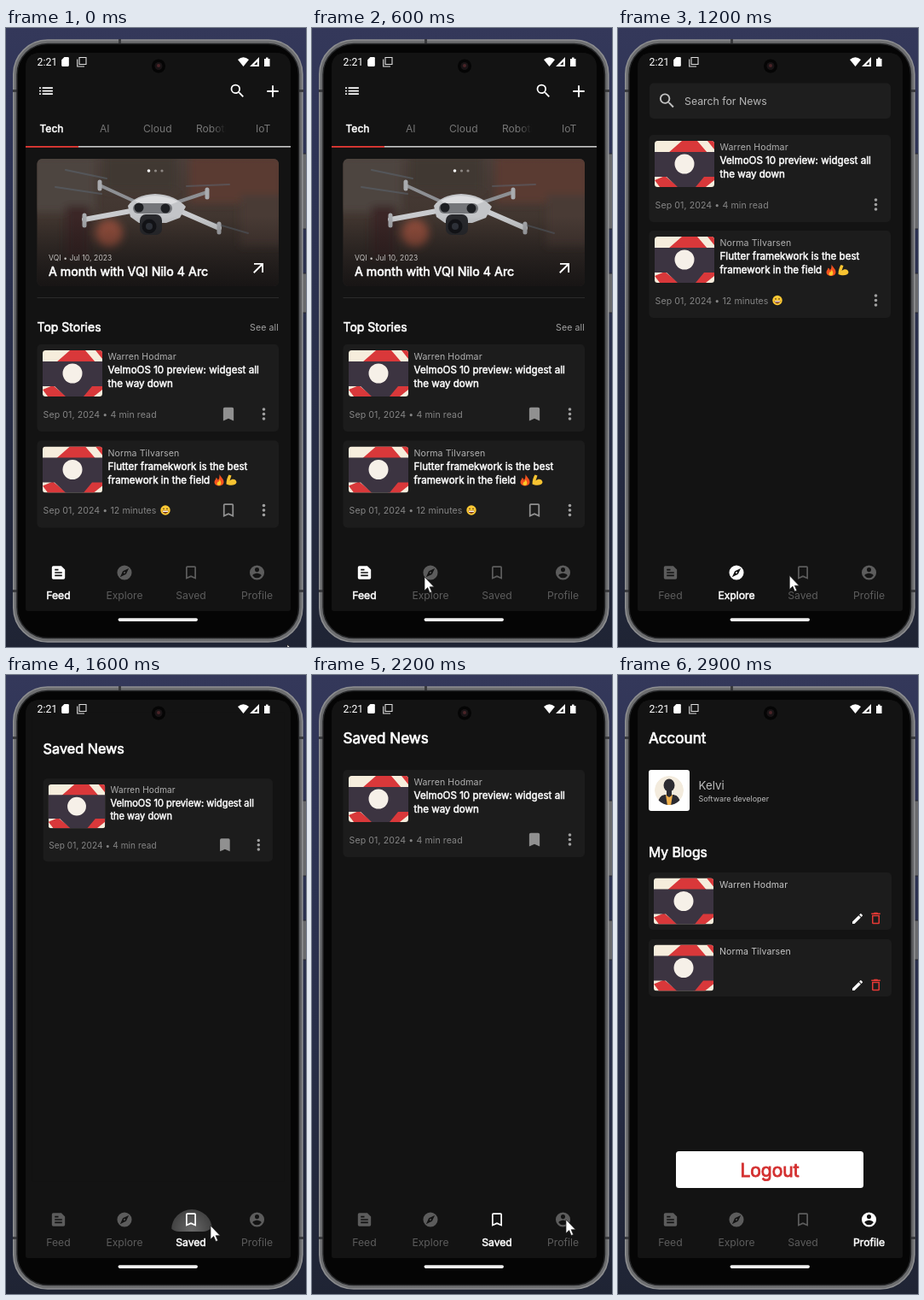
Recreate the animation shown at these times as an HTML page. Size 352 by 724 pixels, loop 3.1 s.

```html
<!DOCTYPE html>
<html lang="en">
<head>
<meta charset="utf-8">
<title>News app</title>
<style>
html, body { margin: 0; width: 100%; height: 100%; overflow: hidden; background: #282e48; }
svg { display: block; font-family: Inter, sans-serif; }
</style>
</head>
<body>
<svg id="stage" width="352" height="724" viewBox="0 0 352 724"></svg>
<script>
const LOOP = 3100, STEP = 100, CX = 178.5, CY = 318;
const RED = '#e53935', stage = document.getElementById('stage');

const ICONS = {
  list: 'M3 9h2V7H3zm0 4h2v-2H3zm0 4h2v-2H3zM7 7v2h14V7zm0 6h14v-2H7zm0 4h14v-2H7z',
  search: 'M15.5 14h-.79l-.28-.27A6.47 6.47 0 0 0 16 9.5 6.5 6.5 0 1 0 9.5 16c1.61 0 3.09-.59 4.23-1.57l.27.28v.79l5 4.99L20.49 19zm-6 0a4.5 4.5 0 1 1 0-9 4.5 4.5 0 0 1 0 9z',
  add: 'M19 13h-6v6h-2v-6H5v-2h6V5h2v6h6z',
  arrow: 'M6 6v2h8.59L5 17.59 6.41 19 16 9.41V18h2V6z',
  saved: 'M17 3H7a2 2 0 0 0-2 2v16l7-3 7 3V5a2 2 0 0 0-2-2z',
  save: 'M17 3H7a2 2 0 0 0-2 2v16l7-3 7 3V5a2 2 0 0 0-2-2zm0 15-5-2.18L7 18V5h10z',
  more: 'M12 8a2 2 0 1 0 0-4 2 2 0 0 0 0 4zm0 2a2 2 0 1 0 0 4 2 2 0 0 0 0-4zm0 6a2 2 0 1 0 0 4 2 2 0 0 0 0-4z',
  feed: 'M16 3H5a2 2 0 0 0-2 2v14a2 2 0 0 0 2 2h14a2 2 0 0 0 2-2V8zM7 7h5v2H7zm10 10H7v-2h10zm0-4H7v-2h10z',
  explore: 'M12 10.9a1.1 1.1 0 1 0 0 2.2 1.1 1.1 0 0 0 0-2.2zM12 2a10 10 0 1 0 0 20 10 10 0 0 0 0-20zm2.19 12.19L6 18l3.81-8.19L18 6z',
  profile: 'M12 2a10 10 0 1 0 0 20 10 10 0 0 0 0-20zm0 3a3 3 0 1 1 0 6 3 3 0 0 1 0-6zm0 14.2A7.2 7.2 0 0 1 6 15.98c.03-1.99 4-3.08 6-3.08s5.97 1.09 6 3.08a7.2 7.2 0 0 1-6 3.22z',
  edit: 'M3 17.25V21h3.75L17.81 9.94l-3.75-3.75zM20.71 7.04a1 1 0 0 0 0-1.41l-2.34-2.34a1 1 0 0 0-1.41 0l-1.83 1.83 3.75 3.75z',
  trash: 'M6 19a2 2 0 0 0 2 2h8a2 2 0 0 0 2-2V7H6zM8 9h8v10H8zm7.5-5-1-1h-5l-1 1H5v2h14V4z',
  sdcard: 'M18 2h-8L4 8v12a2 2 0 0 0 2 2h12a2 2 0 0 0 2-2V4a2 2 0 0 0-2-2z'
};

// Drawing helpers
const icon = (name, x, y, fill = '#fff', size = 21) =>
  `<path d="${ICONS[name]}" fill="${fill}" fill-rule="evenodd" transform="translate(${x - size / 2} ${y - size / 2}) scale(${size / 24})"/>`;
const text = (x, y, s, size, fill = '#fff', extra = '') =>
  `<text x="${x}" y="${y}" font-size="${size}" fill="${fill}" ${extra}>${s}</text>`;
// The app thickens the regular face instead of using a bold one.
const bold = (x, y, s, size, fill = '#fff', extra = '') =>
  text(x, y, s, size, fill, `stroke="${fill}" stroke-width="${size * .042}" ${extra}`);
const label = (x, y, s, fill) => text(x, y, s, 10.57, fill, 'letter-spacing=".1"');
const box = (x, y, w, h, fill, r = 0, extra = '') =>
  `<rect x="${x}" y="${y}" width="${w}" height="${h}" rx="${r}" fill="${fill}" ${extra}/>`;
const disc = (x, y, r, fill) => `<circle cx="${x}" cy="${y}" r="${r}" fill="${fill}"/>`;
const path = (d, fill, extra = '') => `<path d="${d}" fill="${fill}" ${extra}/>`;
const at = (x, y, body) => `<g transform="translate(${x} ${y})">${body}</g>`;

const thumb = (x, y) => at(x, y, `<g clip-path="url(#thumbClip)">
  ${box(0, 0, 70, 54, '#f6eddc')}
  ${path('M16 14L32 0H50L62 14ZM62 0H70V10ZM0 46L12 41 28 54H6ZM46 54L56 41H70V46L60 54Z', '#d9383a')}
  ${path('M0 13H70V42H58L48 54H27L14 42H0Z', '#3c3441')}
  ${disc(35, 27, 11.5, '#f6f0e8')}</g>`);

const fire = path('M6 0C7 3 11 5 11 9 11 15 0 15 0 9 0 7 2 6 2 4 4 5 4 6 4 7 6 5 6 3 6 0Z', '#f4511e') +
  path('M6 6C9 10 8 13 5.5 13 2 13 3 10 4 9 5 9 6 8 6 6Z', '#ffca28');
const muscle = path('M3 0L6 1 5 4 4 7C7 4 12 5 12 9 11 13 4 13 0 11 0 7 1 3 3 0Z', '#f7c331');
const grin = disc(0, 0, 5.7, '#fcc934') + disc(-2, -1.6, .8, '#5b3d1d') + disc(2, -1.6, .8, '#5b3d1d') +
  path('M-3.6 .6H3.6C3 5 -3 5 -3.6 .6Z', '#7a3a20') + path('M-3 .8H3V1.9H-3Z', '#fff');

const STORIES = [
  { author: 'Warren Hodmar', lines: ['VelmoOS 10 preview: widgest all', 'the way down'], info: '4 min read', mark: 'saved', art: '' },
  { author: 'Norma Tilvarsen', lines: ['Flutter framekwork is the best', 'framework in the field'], info: '12 minutes', mark: 'save',
    art: at(244.5, 39.5, fire) + at(258.5, 40, muscle) + at(187, 81.5, grin) }
];

const card = (y, { author, lines, info, mark, art }, withMark = true) => at(0, y,
  box(36.5, 0, 283.5, 102, '#1c1c1c', 5) + thumb(43, 7) + label(119.5, 18, author, '#b0b0b0') +
  lines.map((s, i) => bold(119.5, 34 + 16 * i, s, 11.6)).join('') +
  label(43.5, 85.5, `Sep 01, 2024 • ${info}`, '#858585') + art +
  (withMark ? icon(mark, 261, 81.5, '#909090') : '') + icon('more', 302.5, 81.5, '#a0a0a0', 22));

const blogCard = (y, { author }) => at(0, y, box(36, 0, 285, 67, '#1c1c1c', 5) + thumb(42, 6.5) +
  label(119, 18, author, '#c4c4c4') + icon('edit', 281, 54, '#fff', 16) + icon('trash', 302.5, 53.5, RED, 18));

const drone = `
  <g fill="none" stroke-linecap="round">
    <path d="M58 186L112 194M70 166L118 176M212 185L262 183M222 222L284 240" stroke="#5d6874" stroke-width="2" opacity=".5"/>
    <path d="M158 206L110 184M200 204L236 192" stroke="#8d8f93" stroke-width="4"/>
    <path d="M152 213L92 224M204 214L250 234" stroke="#c9cbce" stroke-width="6"/>
    <path d="M110 180V188M236 189V198M92 219V231M250 229V239" stroke="#a9abaf" stroke-width="5"/>
  </g>
  ${path('M143 208Q152 195 175 194 198 195 211 209L204 222 188 228H156L146 221Z', '#c3c5c8')}
  ${path('M151 202Q175 190 202 203L192 207H160Z', '#dcdddf')}
  ${box(149, 205, 46, 12, '#74767a', 6)}
  ${disc(156, 210, 5.5, '#1d1f23')}${disc(187, 211, 5.5, '#1d1f23')}
  ${box(157, 218, 26, 24, '#28292d', 7)}${disc(168, 232, 8.5, '#121317')}${disc(168, 232, 4, '#30343c')}`;

const hero = `<g clip-path="url(#heroClip)">
  ${box(36, 153, 285, 150, 'url(#photo)')}
  <g filter="url(#blur)">${box(30, 150, 75, 65, '#4d4541')}${box(115, 150, 85, 40, '#403733')}
    ${box(215, 150, 110, 55, '#5a3b33')}${box(275, 195, 50, 60, '#493a35')}
    ${box(70, 208, 28, 60, '#3a2826')}${disc(121, 240, 16, '#94503c')}</g>
  ${drone}${box(36, 220, 285, 83, 'url(#shade)')}</g>`;

const page = body => box(23, 29, 311, 578, '#131313') + body;

const feed = page(
  icon('list', 47, 73.5) + icon('search', 271.5, 73.5) + icon('add', 313, 74, '#fff', 23) +
  bold(39.5, 122, 'Tech', 12.08) +
  [[110, 'AI'], [161, 'Cloud'], [223, 'Robotics', 'url(#tabFade)'], [293, 'IoT']]
    .map(([x, s, fill = '#757575']) => text(x, 122, s, 12.08, fill)).join('') +
  box(85, 138, 249, 1.6, '#c8c8c8') + box(23, 138, 62, 1.8, RED) + hero +
  disc(167.5, 167, 1.8, '#fff') + disc(175.5, 167, 1.6, '#8d8783') + disc(183, 167, 1.6, '#8d8783') +
  text(50, 272, 'VQI • Jul 10, 2023', 8.5, '#c5c2c0', 'letter-spacing=".1"') +
  bold(50, 290, 'A month with VQI Nilo 4 Arc', 14.25) + icon('arrow', 296.5, 280.5, '#fff', 22) +
  box(36.5, 315, 283.5, 1, '#2b2b2b') + bold(36.5, 354.5, 'Top Stories', 14) +
  label(286, 354, 'See all', '#a0a0a0') + card(370, STORIES[0]) + card(482.5, STORIES[1]));

const explore = page(
  box(37, 64.5, 283, 41.5, '#1e1e1e', 5) + icon('search', 57.5, 85, '#c0c0c0', 23) +
  text(78, 90, 'Search for News', 12.3, '#b8b8b8') +
  card(125, STORIES[0], false) + card(237, STORIES[1], false));

const saved = page(bold(36.5, 80, 'Saved News', 17.1) + card(111, STORIES[0]));

const avatar = box(36, 111, 48, 48, '#fff', 3) + `<g clip-path="url(#avatarClip)">
  ${disc(60, 135, 17, '#f3ebdd')}${path('M46 153Q47 141 55 140H65Q73 141 74 153Z', '#2c2b31')}
  ${path('M56 140H64L62 153H58Z', '#efb04c')}${path('M57 134H63V141L60 143 57 141Z', '#2c2b31')}
  <ellipse cx="60" cy="129" rx="6.5" ry="7.5" fill="#2c2b31"/></g>`;

const profile = page(
  bold(36, 80, 'Account', 17.1) + avatar +
  text(94.5, 134, 'Kelvi', 13.3, '#bdbdbd') + text(94.5, 148, 'Software developer', 8.95, '#bdbdbd') +
  bold(36, 213, 'My Blogs', 15.7) + blogCard(231, STORIES[0]) + blogCard(309, STORIES[1]) +
  box(68, 557, 220, 43, '#fff', 3.5) + bold(178, 586.5, 'Logout', 21, '#d32f2f', 'text-anchor="middle"'));

// Each view opens at `start`; its tap lands at `tap`.
const VIEWS = [
  { name: 'Feed', glyph: 'feed', body: feed, start: -1e4, x: 61.5, tap: [61, 637] },
  { name: 'Explore', glyph: 'explore', body: explore, start: 880, x: 139, tap: [130, 641] },
  { name: 'Saved', glyph: 'save', body: saved, start: 1537, x: 217, tap: [218, 649] },
  { name: 'Profile', glyph: 'profile', body: profile, start: 2342, x: 294.5, tap: [298, 638] }
];

const navItem = ({ name, glyph, x }, on) => {
  const fill = on ? '#fff' : '#5c5c5c', write = on ? bold : text;
  return icon(glyph, x, 637, fill, 20.5) + write(x, 667.5, name, 12.2, fill, 'text-anchor="middle"');
};

const gradient = (id, stops, extra = 'x2="0" y2="1"') => `<linearGradient id="${id}" ${extra}>${stops.map(
  ([o, c, a = 1]) => `<stop offset="${o}" stop-color="${c}" stop-opacity="${a}"/>`).join('')}</linearGradient>`;

const defs = `<defs>
  ${gradient('desk', [[0, '#34385a'], [.2, '#2e3456'], [.6, '#282e48'], [1, '#1f2434']])}
  ${gradient('metal', [[0, '#6d6e70'], [.5, '#5a5b5e'], [1, '#6d6e70']])}
  ${gradient('photo', [[0, '#4a3e39'], [.5, '#40352f'], [1, '#2d2726']])}
  ${gradient('shade', [[0, '#0c0b0b', 0], [1, '#0c0b0b', .65]])}
  ${gradient('tabFade', [[0, '#757575'], [1, '#757575', 0]], 'gradientUnits="userSpaceOnUse" x1="242" x2="258"')}
  <radialGradient id="glow"><stop offset="0" stop-color="#fff" stop-opacity=".36"/><stop offset="1" stop-color="#fff" stop-opacity=".2"/></radialGradient>
  <filter id="blur"><feGaussianBlur stdDeviation="5"/></filter>
  <clipPath id="screen"><path d="M23 47Q23 29 41 29H316Q334 29 334 47V679Q334 682 331 682H26Q23 682 23 679Z"/></clipPath>
  <clipPath id="thumbClip"><rect width="70" height="54" rx="3.5"/></clipPath>
  <clipPath id="heroClip"><rect x="36.5" y="153" width="283.5" height="149" rx="6"/></clipPath>
  <clipPath id="avatarClip"><circle cx="60" cy="135" r="17"/></clipPath>
  <clipPath id="pill"><rect x="-27.5" y="-13.5" width="55" height="27" rx="13.5"/></clipPath>
</defs>`;

const phone = box(0, 0, 352, 724, 'url(#desk)') +
  [[147, 88], [287, 46]].map(([y, h]) => box(347, y, 6, h, '#696a6d', 1, 'stroke="#26272c"')).join('') +
  box(8.8, 14, 339, 704, 'url(#metal)', 40, 'stroke="#8e8f91" stroke-width="1.6"') +
  [[8, 72, 6, 3], [343, 72, 6, 3], [8, 657, 6, 3], [343, 657, 6, 3], [132, 13, 3, 6]]
    .map(r => box(...r, '#3a3b3e')).join('') +
  box(13, 18.5, 330.5, 695, '#050505', 36, 'stroke="#242527" stroke-width="1.5"');

const status = text(36.5, 43.5, '2:21', 12.3, '#fff', 'font-family="Roboto, sans-serif"') +
  icon('sdcard', 69.5, 39.5, '#fff', 13) +
  path('M86 34.5H94V42.5H86ZM83.7 36.5V45H92', 'none', 'stroke="#ddd" stroke-width="1.1"') +
  path('M278.5 45L272 37Q278.5 31.5 285 37ZM297 34V45H286ZM294.8 39.3V43H291.1ZM303 36H305V34.5H307.5V36H309.5V45H303Z',
    '#fff', 'fill-rule="evenodd"') +
  disc(179, 44.5, 8, '#050505') + disc(179, 44.5, 4.5, '#191416') + disc(179, 44, 2, '#4a2428');

stage.innerHTML = defs + phone + `<g clip-path="url(#screen)">${box(23, 29, 311, 653, '#131313')}
  ${VIEWS.map(v => `<g class="view">${v.body}</g>`).join('')}
  <g id="ripple"><g clip-path="url(#pill)"><circle fill="url(#glow)"/></g></g>
  ${VIEWS.map(v => `<g class="off">${navItem(v, false)}</g><g class="on">${navItem(v, true)}</g>`).join('')}</g>` +
  status + box(131.5, 690.3, 93.5, 3.6, '#f2f2f2', 1.8) +
  `<path id="cursor" d="M0 0V16L3.7 12.6 6.2 18.5 8.6 17.5 6.1 11.7H11.2Z" fill="#fff" stroke="#222" stroke-width=".7"/>`;

const all = s => [...stage.querySelectorAll(s)];
const views = all('.view'), on = all('.on'), off = all('.off');
const ripple = stage.querySelector('#ripple'), spot = ripple.querySelector('circle'), cursor = stage.querySelector('#cursor');
const clamp = v => Math.min(1, Math.max(0, v));
const show = (el, yes) => el.setAttribute('visibility', yes ? 'visible' : 'hidden');

// Pointer path: time, x, y
const POINTER = [[0, 330, 721], [300, 236, 692], [600, 132, 642], [800, 130, 640], [900, 157, 639], [1300, 216, 641],
  [1500, 219, 643], [1600, 240, 644], [2000, 292, 638], [2200, 298, 637], [2400, 298, 637], [2500, 250, 680], [2700, 205, 730], [LOOP, 205, 730]];

function pointerAt(t) {
  const i = POINTER.findIndex(p => p[0] > t), [t0, x0, y0] = POINTER[i - 1], [t1, x1, y1] = POINTER[i];
  const k = (t - t0) / (t1 - t0);
  return [x0 + (x1 - x0) * k, y0 + (y1 - y0) * k];
}

function draw(t) {
  const current = VIEWS.findLastIndex(v => t > v.start - 40);
  VIEWS.forEach((v, i) => {
    const dt = t - v.start, next = VIEWS[i + 1];
    const scale = .92 + .08 * (1 - (1 - clamp(dt / 300)) ** 2);
    views[i].setAttribute('transform', `translate(${CX} ${CY}) scale(${scale}) translate(${-CX} ${-CY})`);
    views[i].setAttribute('opacity', clamp((dt + 42) / 70));
    show(views[i], i <= current && !(next && t > next.start + 300));
    show(on[i], i === current);
    show(off[i], i !== current);
  });
  const { x, tap, start } = VIEWS[current], dt = t - start;
  ripple.setAttribute('transform', `translate(${x} 637.5)`);
  ripple.setAttribute('opacity', clamp((300 - dt) / 120));
  spot.setAttribute('cx', tap[0] - x);
  spot.setAttribute('cy', tap[1] - 637.5);
  spot.setAttribute('r', dt < 400 ? Math.max(0, dt * .38) : 0);
  cursor.setAttribute('transform', `translate(${pointerAt(t)})`);
}

// The screen refreshes ten times a second.
function tick() {
  const t = performance.now() % LOOP;
  draw(Math.floor(t / STEP) * STEP);
  requestAnimationFrame(tick);
}
tick();
</script>
</body>
</html>
```
